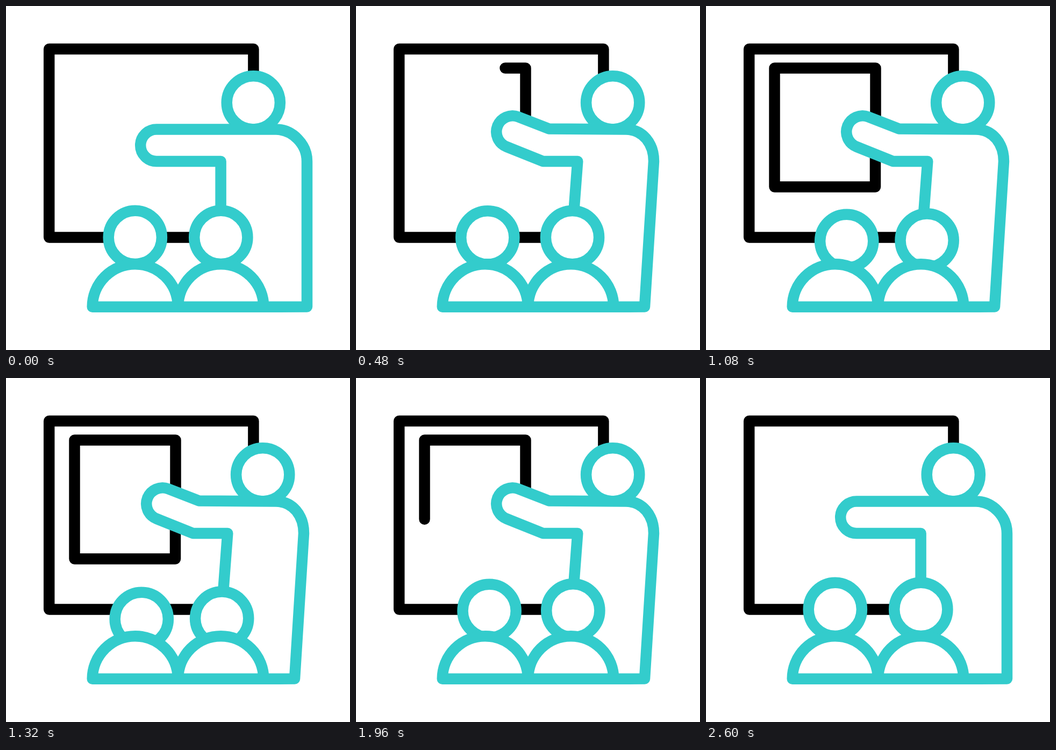
An HTML page that plays this animation: 640 px wide and 640 px high, repeating every 3000 ms.

```html
<!DOCTYPE html>
<html lang="en">
<head>
<meta charset="utf-8">
<title>Presentation</title>
<style>
  html, body { margin: 0; width: 100%; height: 100%; overflow: hidden; background: #fff; }
  svg { display: block; width: 100%; height: 100%; }
  .ink { fill: none; stroke: #000; }
  .person { fill: #fff; stroke: #3cc; }
  .ink, .person { stroke-width: 20.5; stroke-linejoin: round; stroke-linecap: round; }
</style>
</head>
<body>
<svg viewBox="0 0 640 640">
  <rect class="ink" x="80.2" y="80" width="380.2" height="350.5"/>
  <path class="ink" id="sheet" pathLength="1" d="M315.5 250V115.5H127.5V336.5H315V250"/>
  <g class="person">
    <circle id="speakerHead" cy="179.8" r="49.6"/>
    <path id="speaker"/>
    <circle id="leftHead" r="49.6"/>
    <circle id="rightHead" r="49.6"/>
    <path d="M160.7 559.8A79.6 79.6 0 0 1 319.9 559.8Z"/>
    <path d="M320.1 559.8A79.6 79.6 0 0 1 479.3 559.8Z"/>
  </g>
</svg>
<script>
const LOOP = 3000, STEP = 40;
const el = id => document.getElementById(id);
const linear = k => k;
const smooth = k => k * k * (3 - 2 * k);
const cubic = k => k ** 3;
const span = (t, from, to, ease = linear) =>
  ease(Math.min(1, Math.max(0, (t - from) / (to - from))));

// The forearm turns about the elbow while the torso leans; lift goes from 0 to 1.
function speakerPath(lift) {
  const angle = 0.37 * lift, half = 29.8, reach = 67;
  const sin = Math.sin(angle), cos = Math.cos(angle);
  const elbowX = 347 + 6.5 * lift, elbowY = 259.3 - lift;
  const handX = elbowX - reach * cos, handY = elbowY - reach * sin;
  const bend = half * Math.tan(angle / 2);
  const shoulder = 560 - 6 * lift, chest = 399.6 + 12.7 * lift;
  return `M502 229.6
    L${elbowX + bend} ${elbowY - half}
    L${handX + half * sin} ${handY - half * cos}
    A${half} ${half} 0 0 0 ${handX - half * sin} ${handY + half * cos}
    L${elbowX - bend} 289 H${chest}
    L${399.6 - 7.6 * lift} 559.8 L${560 - 23 * lift} 559.6 L${shoulder} 289
    C${shoulder} ${257 - 2 * lift} 533 229.6 502 229.6Z`;
}

function placeHead(id, x, y) {
  el(id).setAttribute('cx', x);
  el(id).setAttribute('cy', y);
}

function draw(t) {
  const lift = span(t, 80, 400, smooth) - span(t, 2280, 2600, smooth);
  el('speaker').setAttribute('d', speakerPath(lift));
  placeHead('speakerHead', 460.3 + 17.4 * lift, 179.8);

  const drawn = span(t, 295, 920, smooth) - span(t, 1760, 2230);
  el('sheet').style.strokeDasharray = `${drawn} 2`;
  el('sheet').style.visibility = drawn > 0.001 ? 'visible' : 'hidden';

  // Listeners lean in, nod quickly down and slowly up, then sit back.
  const away = 1 - span(t, 1760, 2080);
  const lean = span(t, 318, 920, smooth) * away;
  const nod = (span(t, 1040, 1180) - 0.67 * span(t, 1180, 1640, cubic)) * away;
  const listen = (id, x, dx, dy) =>
    placeHead(id, x + dx * lean - 13.6 * nod, 430.4 + dy * lean + 16 * nod);
  listen('leftHead', 240.3, 25.3, 2.3);
  listen('rightHead', 399.8, 15.2, 1.1);
}

function tick() {
  draw(Math.floor(performance.now() % LOOP / STEP) * STEP);
  requestAnimationFrame(tick);
}
tick();
</script>
</body>
</html>
```
